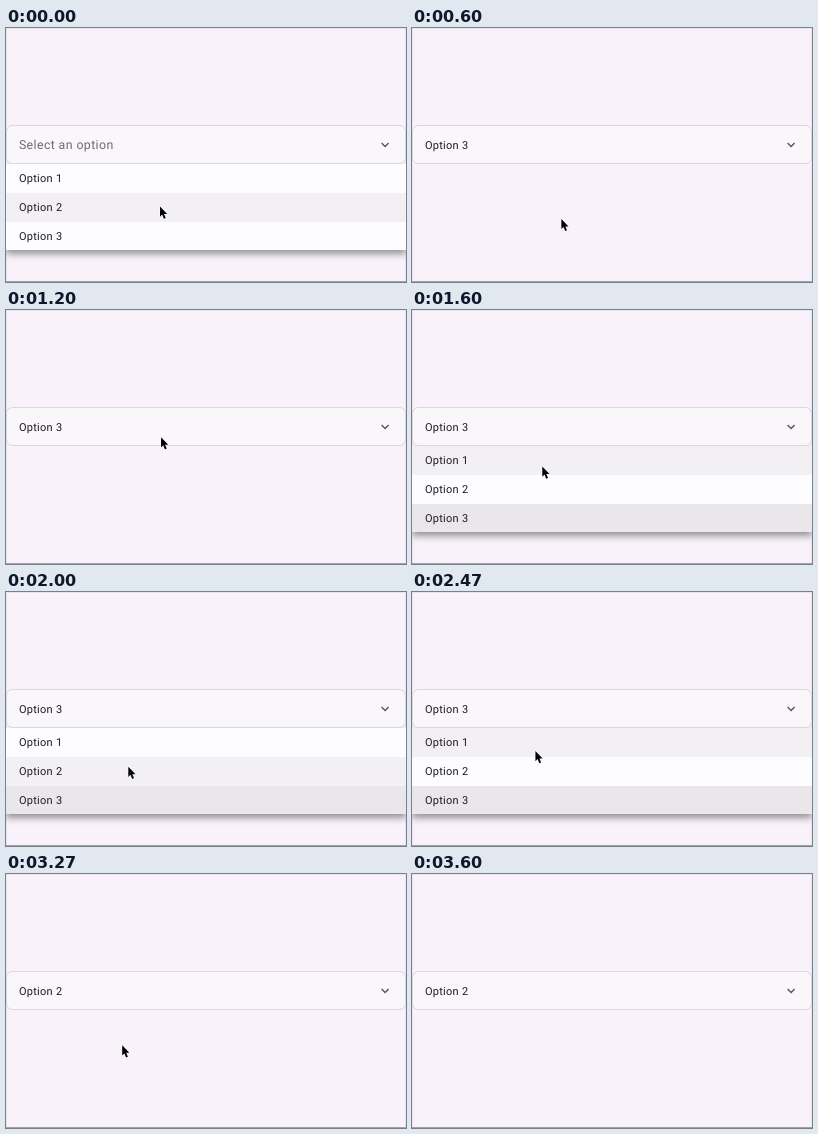
These frames come from a looping animation (400x254 px, 4600 ms). An HTML page:

```html
<!DOCTYPE html>
<html lang="en">
<head>
<meta charset="utf-8">
<title>Dropdown</title>
<style>
  html, body { margin: 0; height: 100%; overflow: hidden; background: #f9f2fa; }
  svg { display: block; width: 400px; height: 254px; }
  text {
    font: 11px Roboto, sans-serif; letter-spacing: .025em; fill: #1d1b20;
    text-rendering: geometricPrecision;
  }
  .hint { font-size: 12.4px; letter-spacing: .03em; fill: #6c6a6e; }
  #menu { filter: drop-shadow(0 4px 3.5px rgba(0, 0, 0, .4)); }
  #menu rect { shape-rendering: crispEdges; }
</style>
</head>
<body>
<svg viewBox="0 0 400 254">
  <rect width="400" height="254" fill="#f9f2fa"/>
  <path d="M0 .5H400M.5 0V254M399.5 0V254" stroke="#ebe4ed"/>
  <path d="M0 253.5H400" stroke="#a5a0a8"/>
  <g id="menu"></g>
  <rect x=".5" y="97.5" width="399" height="38" rx="6" fill="#f9f7fa" stroke="#dad6dc"/>
  <text id="value" x="12.9" y="120.8"></text>
  <path d="M375.6 115l3.5 3.5 3.5-3.5" fill="none" stroke="#55525a" stroke-width="1.3"/>
  <path id="cursor" d="M0 0V10.2L2.2 8.1 3.9 12.2 5.7 11.4 4 7.5H7.2Z" stroke="#fff" paint-order="stroke"/>
</svg>
<script>
const TICK = 1000 / 15, LOOP = 4600;
const PICK_THIRD = 8, REOPEN = 19, PICK_SECOND = 49;
const ROW_TOP = 136, ROW_HEIGHT = 28.8;
const PLAIN = '#fdfcfe', HOVER = '#f2f0f3', SELECTED = '#e9e7ea';

const start = { x: 154, y: 178.5 };
const moves = [
  { from: 0, to: 4, x: 148, y: 203 },
  { from: 7, to: 15, x: 156.5, y: 125.5 },
  { from: 17, to: 24, x: 130.3, y: 156.5 },
  { from: 24, to: 30, x: 122.3, y: 174.7 },
  { from: 32, to: 36, x: 124, y: 158 },
  { from: 36, to: 42, x: 116.2, y: 171.3 },
  { from: 51, to: 54, x: 70, y: -30 }
];

const $ = id => document.getElementById(id);
const menu = $('menu'), value = $('value'), cursor = $('cursor');

menu.innerHTML = [0, 1, 2].map(i => {
  const y = ROW_TOP + i * ROW_HEIGHT;
  return `<rect y="${y}" width="400" height="${ROW_HEIGHT}"/>
    <text x="12.9" y="${y + 18.4}">Option ${i + 1}</text>`;
}).join('');
const rows = menu.querySelectorAll('rect');

const ease = k => k * k * (3 - 2 * k);

// Each move carries the pointer on from wherever the last one left it.
function pointerAt(tick) {
  return moves.reduce((p, { from, to, x, y }) => {
    const k = ease(Math.min(1, Math.max(0, (tick - from) / (to - from))));
    return { x: p.x + (x - p.x) * k, y: p.y + (y - p.y) * k };
  }, start);
}

function draw(now) {
  const tick = Math.floor((now % LOOP + 4) / TICK);
  const { x, y } = pointerAt(tick);
  const open = tick < PICK_THIRD || (tick >= REOPEN && tick < PICK_SECOND);
  const choice = tick < PICK_THIRD ? 0 : tick < PICK_SECOND ? 3 : 2;
  const hovered = Math.floor((y - ROW_TOP) / ROW_HEIGHT);

  cursor.setAttribute('transform', `translate(${x} ${y})`);
  menu.style.display = open ? '' : 'none';
  rows.forEach((row, i) =>
    row.setAttribute('fill', i + 1 === choice ? SELECTED : i === hovered ? HOVER : PLAIN));
  value.textContent = choice ? `Option ${choice}` : 'Select an option';
  value.setAttribute('class', choice ? '' : 'hint');
  requestAnimationFrame(draw);
}
draw(0);
</script>
</body>
</html>
```
